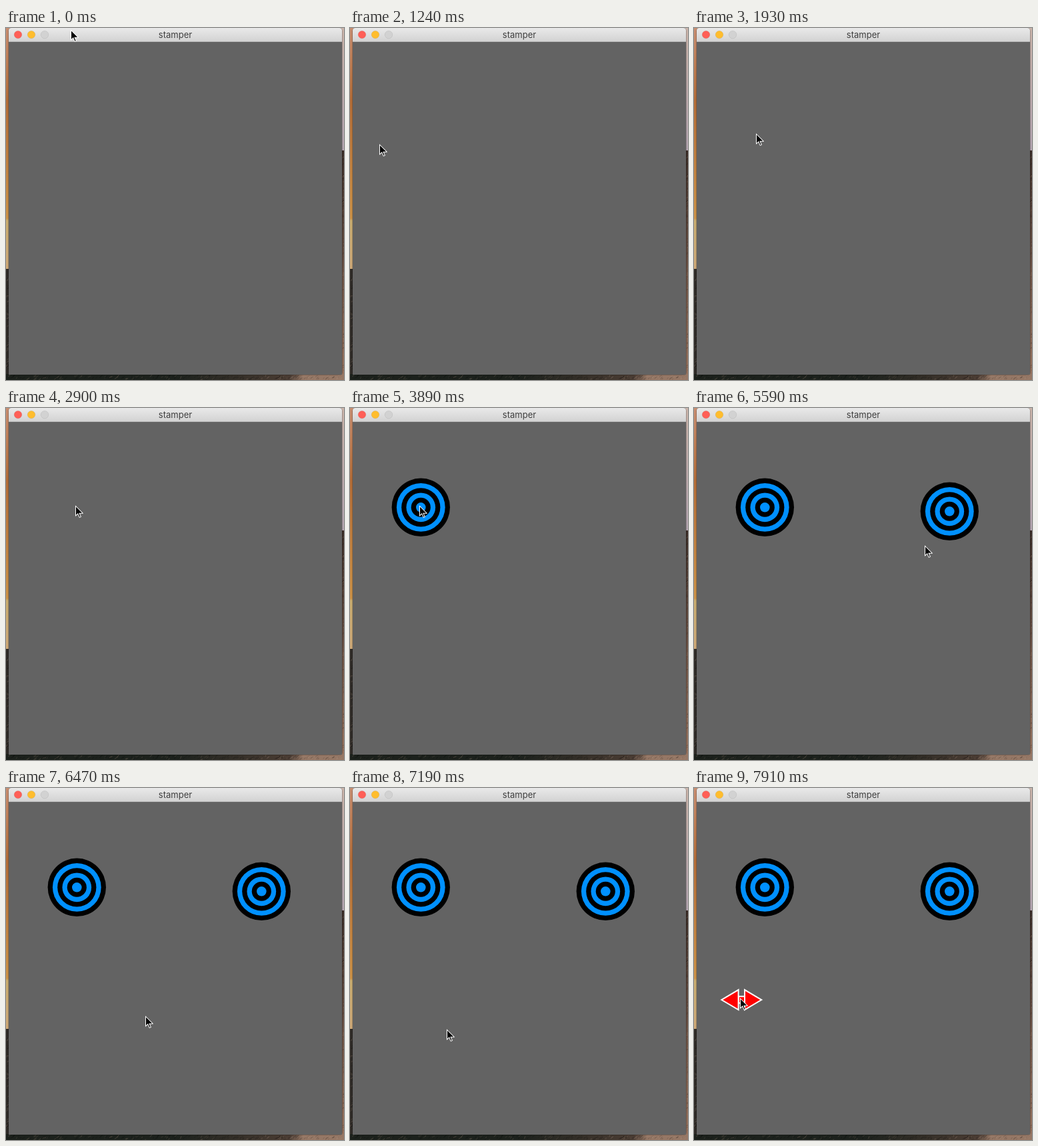
Recreate the animation shown at these times as an HTML page. Size 507 by 529 pixels, loop 8000 ms.

```html
<!DOCTYPE html>
<html lang="en">
<head>
<meta charset="utf-8">
<title>stamper</title>
<style>
  html, body { margin: 0; width: 100%; height: 100%; overflow: hidden; background: #2a2622; }
  svg { display: block; width: 100vw; height: 100vh; }
  text { font: 13px Inter, Roboto, sans-serif; fill: #3e3e3e; text-anchor: middle; }
</style>
</head>
<body>
<svg viewBox="0 0 507 529" xmlns="http://www.w3.org/2000/svg">
  <defs>
    <linearGradient id="sky" x2="0" y2="1">
      <stop stop-color="#c78d70"/>
      <stop offset=".3" stop-color="#b36d38"/>
      <stop offset=".79" stop-color="#cc9248"/>
      <stop offset=".8" stop-color="#c8ac70"/>
      <stop offset="1" stop-color="#cda878"/>
    </linearGradient>
    <linearGradient id="haze" x2="0" y2="1">
      <stop stop-color="#c9b3a9"/>
      <stop offset="1" stop-color="#b3a5b0"/>
    </linearGradient>
    <linearGradient id="cliff" x2="0" y2="1">
      <stop stop-color="#3a2c26"/>
      <stop offset="1" stop-color="#977460"/>
    </linearGradient>
    <linearGradient id="ground">
      <stop offset=".5" stop-color="#1c211c"/>
      <stop offset=".84" stop-color="#4a3c33"/>
      <stop offset=".88" stop-color="#957765"/>
    </linearGradient>
    <linearGradient id="bar" x2="0" y2="1">
      <stop stop-color="#e9e9e9"/>
      <stop offset="1" stop-color="#d2d2d2"/>
    </linearGradient>
  </defs>

  <rect width="6" height="362" fill="url(#sky)"/>
  <rect y="362" width="6" height="167" fill="#2f2b27"/>
  <rect x="502" width="5" height="184" fill="url(#haze)"/>
  <rect x="502" y="184" width="5" height="345" fill="url(#cliff)"/>
  <rect y="520" width="507" height="9" fill="url(#ground)"/>
  <g id="rock"></g>

  <rect x="3.5" y=".5" width="501" height="521" rx="4" fill="none" stroke="#000" stroke-opacity=".2"/>
  <path d="M4 521V4a4 4 0 0 1 4-4H500a4 4 0 0 1 4 4V521z" fill="#636363"/>
  <path d="M4 21V4a4 4 0 0 1 4-4H500a4 4 0 0 1 4 4V21z" fill="url(#bar)"/>
  <rect x="4" y="20" width="500" height="1" fill="#b8b8b8"/>
  <g id="lights"></g>
  <text x="254" y="15">stamper</text>

  <g id="stamps"></g>
  <g id="cursor">
    <path d="M0-.7V16L3.6 12.8 6 18 9 16.8 6.9 11.8H11.8V11.1z" fill="#fff"/>
    <path d="M1 1.5V13.7L3.9 11 6.5 16.8 7.7 16.2 5.3 10.7H10.2z"/>
  </g>
</svg>
<script>
const LOOP = 8000;
const TICK = 88;
const $ = id => document.getElementById(id);

function add(parent, tag, attrs) {
  const el = document.createElementNS("http://www.w3.org/2000/svg", tag);
  for (const k in attrs) el.setAttribute(k, attrs[k]);
  parent.appendChild(el);
  return el;
}

["#ff5f57", "#ffbd2e", "#d2d2d2"].forEach((fill, i) =>
  add($("lights"), "circle", {
    cx: 18 + 20 * i, cy: 10, r: 5.8, fill, stroke: "#000", "stroke-opacity": .1, "stroke-width": .7
  }));

// Short slanted streaks of rock along the visible desktop edges
let seed = 7;
const rand = () => (seed = seed * 16807 % 2147483647) / 2147483647;
function streaks(x, y, w, h) {
  for (let i = w * h / 12; i > 0; i--) {
    add($("rock"), "path", {
      d: `M${x + rand() * w} ${y + rand() * h}l${1 + rand() * 4} -${1 + rand() * 3}`,
      stroke: rand() < .6 ? "#000" : "#b59a86", opacity: .1 + rand() * .2
    });
  }
}
streaks(0, 366, 4, 155);
streaks(504, 188, 3, 333);
streaks(0, 524, 507, 5);

// The pointer glides to each stop in turn and rests there until the next
const glides = [
  { start: 900, end: 1240, x: 44, y: 175 },
  { start: 1330, end: 1590, x: 47, y: 187 },
  { start: 1760, end: 2020, x: 104, y: 152 },
  { start: 2730, end: 2900, x: 104, y: 147 },
  { start: 4250, end: 4970, x: 381, y: 153 },
  { start: 5590, end: 5590, x: 346, y: 207 },
  { start: 5680, end: 6470, x: 209, y: 343 },
  { start: 6560, end: 7190, x: 145, y: 363 },
  { start: 7280, end: 7730, x: 69, y: 316 }
];
const ease = f => 1 - (1 - f) ** 1.2;

function progress({ start, end }, t) {
  if (t >= end) return 1;
  const gaps = Math.round((end - start) / TICK);
  const step = Math.floor((t - start) / (end - start) * gaps + .08);
  return ease((step + 1) / (gaps + 1));
}

function cursorAt(t) {
  let x = 97, y = 3;
  for (const g of glides) {
    if (t < g.start) break;
    const f = progress(g, t);
    x += (g.x - x) * f;
    y += (g.y - y) * f;
  }
  return [Math.round(x), Math.round(y)];
}

function target(g) {
  for (let k = 6; k > 0; k--) {
    add(g, "circle", { r: k * 7.28, fill: k % 2 ? "#0090ff" : "#000" });
  }
}

function arrows(g) {
  const paint = { fill: "#f00", stroke: "#fff", "stroke-width": 2 };
  add(g, "path", { d: "M-4.7-5H4.7V5H-4.7z", ...paint });
  for (const s of [-1, 1]) {
    add(g, "path", { d: `M${30 * s} 0L${4.7 * s}-15V15z`, ...paint });
  }
}

// Each stamp lands where the pointer rests at that time
function stamp(at, shape) {
  const [x, y] = cursorAt(at);
  const el = add($("stamps"), "g", { transform: `translate(${x + 2.3} ${y + 2.3})` });
  shape(el);
  return { at, el };
}
const stamps = [stamp(3890, target), stamp(5140, target), stamp(7910, arrows)];

function draw(t) {
  $("cursor").setAttribute("transform", `translate(${cursorAt(t)})`);
  for (const s of stamps) s.el.setAttribute("visibility", t >= s.at ? "visible" : "hidden");
}

const origin = performance.now();
function tick() {
  draw((performance.now() - origin) % LOOP);
  requestAnimationFrame(tick);
}
tick();
</script>
</body>
</html>
```
